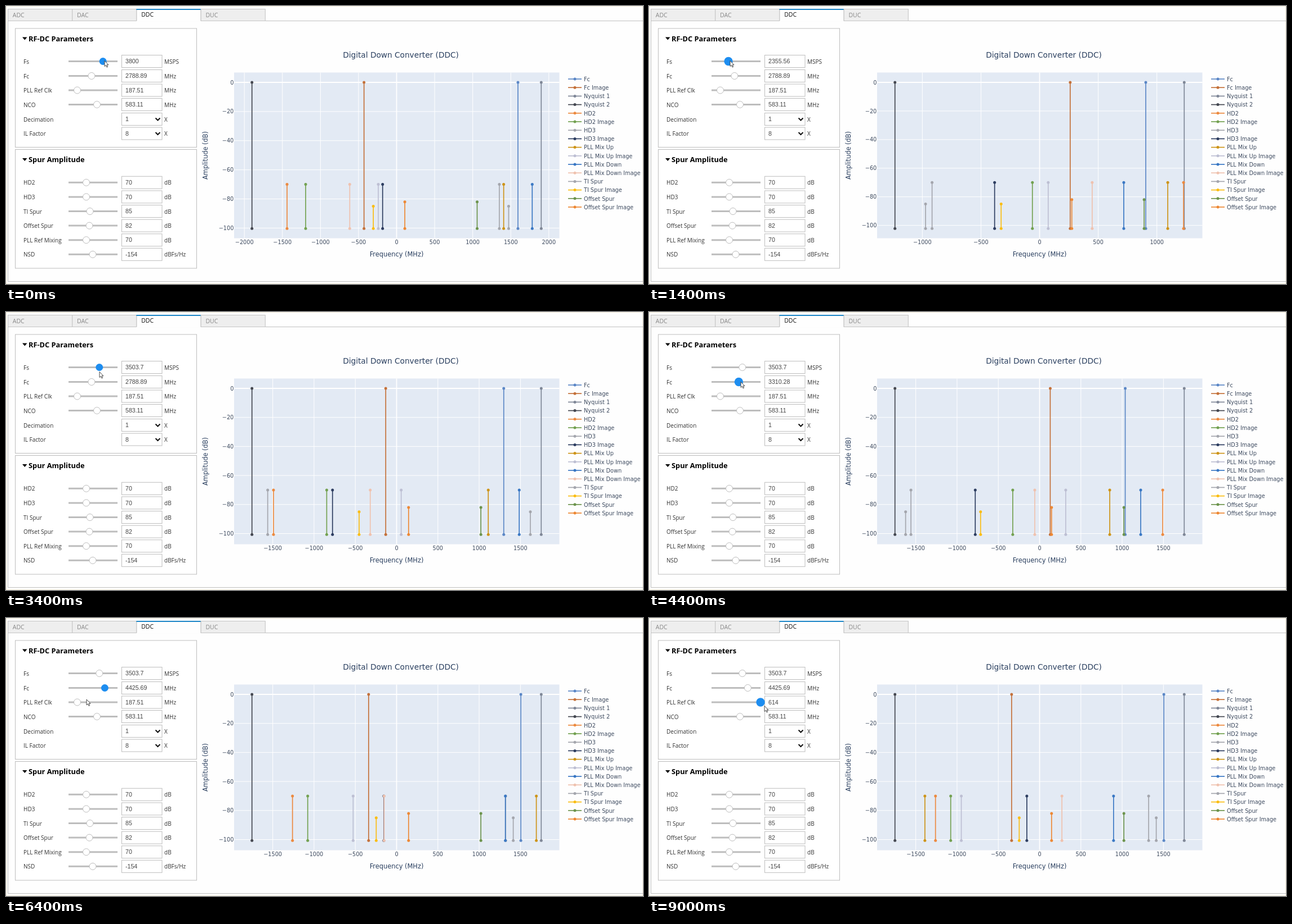
An HTML page for the animation above (9200 ms loop, 1131x495 px).

```html
<!DOCTYPE html>
<html lang="en">
<head>
<meta charset="utf-8">
<title>Digital Down Converter</title>
<style>
html, body { margin: 0; width: 100%; height: 100%; overflow: hidden; background: #fefefe; }
svg { display: block; width: 1131px; height: 495px; }
.ui { font: 10px "Open Sans", sans-serif; fill: #333; }
.tab { font-size: 10.5px; }
.head { font: bold 12.8px "Open Sans", sans-serif; fill: #000; }
.val { font: 10.6px "Liberation Sans", Arial, sans-serif; fill: #444; }
.plot { font: 9.7px "DejaVu Sans", sans-serif; fill: #3d4a5f; }
.axis { font-size: 11.4px; fill: #2a3f5f; }
.title { font-size: 13.7px; fill: #2a3f5f; }
</style>
</head>
<body>
<svg viewBox="0 0 1131 495"><g id="base"></g><g id="live"></g></svg>
<script>
const LOOP = 9200, STEP = 200, NCO = 583.11, NSD = -154;
const X0 = 693.5, HALF = 256.8, TOP = 136, FLOOR = 396.3;
const PLOT = { l: 405, r: 982.5, t: 118.5, b: 413.5 };

// Dragged values over time: [ms, value]
const FS = [[200, 3800], [1200, 2466.67], [1400, 2355.56], [2000, 2800], [2200, 2985.19], [2800, 3503.7]];
const FC = [[4000, 2788.89], [5000, 4092.36], [5200, 4314.58], [5400, 4425.69]];
const PLL = [[6800, 187.51], [7200, 243], [7400, 287.09], [7600, 325.16], [8400, 452.6], [8800, 609.24], [9000, 614]];
const CURSOR_X = [[200, 175], [1200, 146], [1400, 144], [2000, 154], [2200, 158], [2800, 168], [3200, 168],
  [3400, 166], [3800, 154], [4000, 155], [5000, 175], [5200, 180], [5400, 182], [5800, 182],
  [6600, 130], [6800, 130], [7200, 139], [7600, 153], [8400, 175], [8800, 203], [9000, 205]];
const CURSOR_Y = [[200, 97], [3200, 97], [3400, 106], [3800, 123], [5200, 125], [5800, 125],
  [6600, 151], [7600, 152], [9000, 156]];

// Sliders being moved: focus and drag times
const SLIDERS = [
  { keys: FS, y: 98.5, min: 1000, max: 5000, focus: [0, 3800], drag: [200, 3200] },
  { keys: FC, y: 124.5, min: 0, max: 6000, focus: [3800, 6600], drag: [4000, 5800] },
  { keys: PLL, y: 150, min: 100, max: 614, focus: [6600, LOOP], drag: [6800, LOOP] }
];

const SERIES = [
  ["Fc", "#5b87c6"], ["Fc Image", "#c4713a"], ["Nyquist 1", "#7f8797"], ["Nyquist 2", "#454851"],
  ["HD2", "#ec8a40"], ["HD2 Image", "#73a151"], ["HD3", "#a4a6ad"], ["HD3 Image", "#2d3d60"],
  ["PLL Mix Up", "#cd9419"], ["PLL Mix Up Image", "#bdbfd3"], ["PLL Mix Down", "#3a78c4"],
  ["PLL Mix Down Image", "#efc2af"], ["TI Spur", "#a4a6ad"], ["TI Spur Image", "#fabd12"],
  ["Offset Spur", "#6d944d"], ["Offset Spur Image", "#ed8834"]
];

function at(keys, t) {
  if (t <= keys[0][0]) return keys[0][1];
  for (let i = 1; i < keys.length; i++) {
    const [t0, a] = keys[i - 1], [t1, b] = keys[i];
    if (t <= t1) return a + (b - a) * (t - t0) / (t1 - t0);
  }
  return keys[keys.length - 1][1];
}

const within = (t, [a, b]) => t >= a && t < b;
const text = (x, y, cls, s, extra = "") => `<text x="${x}" y="${y}" class="${cls}" ${extra}>${s}</text>`;
const rect = (x, y, w, h, fill, stroke = "none") =>
  `<rect x="${x}" y="${y}" width="${w}" height="${h}" fill="${fill}" stroke="${stroke}"/>`;
const line = (x1, y1, x2, y2, color, w = 1) =>
  `<path d="M${x1} ${y1}L${x2} ${y2}" stroke="${color}" stroke-width="${w}"/>`;
const dot = (x, y, r, fill, stroke = "none") => `<circle cx="${x}" cy="${y}" r="${r}" fill="${fill}" stroke="${stroke}"/>`;
const middle = 'text-anchor="middle"';

function row(y, label, value, unit, knob) {
  return text(31, y + 4, "ui", label) + text(281, y + 4, "ui", unit) +
    rect(205.5, y - 11, 71.5, 22, "#fff", "#bdbdbd") +
    (value === "" ? "" : text(212, y + 3.6, "val", value)) +
    (unit === "X" ? `<path d="M265.5 ${y - 2}l4 4 4-4" fill="none" stroke="#111" stroke-width="2"/>`
      : line(111, y, 198, y, "#bdbdbd", 3)) +
    (knob ? dot(knob, y, 6, "#fff", "#bdbdbd") : "");
}

function panel(y, h, title) {
  return rect(16.5, y, 322, h, "#fff", "#bdbdbd") + text(40, y + 22.5, "head", title) +
    `<path d="M29 ${y + 15.5}h8.5l-4.25 5z" fill="#000"/>`;
}

function drawBase() {
  let s = `<rect x=".5" y=".5" width="1130" height="494" fill="none" stroke="#f6f0dc"/>`;
  s += `<path d="M3.5 26V490.5H1131M3.5 26.5H1131" fill="none" stroke="#c0c0c0"/>`;
  ["ADC", "DAC", "DDC", "DUC"].forEach((name, i) => {
    const x = 3.5 + i * 114.2, on = i === 2;
    s += on ? rect(x, 6, 114.2, 21.5, "#fefefe") + line(x, 6, x, 26.5, "#c0c0c0") +
        line(x + 114.2, 6, x + 114.2, 26.5, "#c0c0c0") + line(x - .5, 6, x + 114.7, 6, "#1c86c7", 2)
      : rect(x, 5.5, 114.2, 21, "#eee", "#c4c4c4");
    s += text(x + 8.3, on ? 19 : 20, "ui tab", name, `style="fill:${on ? "#111" : "#888"}"`);
  });
  s += panel(40, 211.5, "RF-DC Parameters") + panel(255.5, 211.5, "Spur Amplitude");
  s += row(98.5, "Fs", "", "MSPS") + row(124.5, "Fc", "", "MHz") + row(150, "PLL Ref Clk", "", "MHz") +
    row(175.5, "NCO", NCO, "MHz", 161.5) + row(201.5, "Decimation", 1, "X") + row(227, "IL Factor", 8, "X");
  [["HD2", 70, 142.5], ["HD3", 70, 142.5], ["TI Spur", 85, 149], ["Offset Spur", 82, 148],
    ["PLL Ref Mixing", 70, 142.5], ["NSD", NSD, 154]].forEach(([name, v, knob], i) => {
    s += row(314.3 + i * 25.6, name, v, i < 5 ? "dB" : "dBFs/Hz", knob);
  });
  s += rect(PLOT.l, PLOT.t, PLOT.r - PLOT.l, PLOT.b - PLOT.t, "#e3eaf4");
  s += text(701, 92, "plot title", "Digital Down Converter (DDC)", middle);
  s += text(X0, 445.5, "plot axis", "Frequency (MHz)", middle);
  s += text(0, 0, "plot axis", "Amplitude (dB)", middle + ' transform="translate(358 266) rotate(-90)"');
  SERIES.forEach(([name, color], i) => {
    const y = 130 + i * 15.2;
    s += line(998, y, 1022, y, color, 1.7) + dot(1010, y, 2.5, color) + text(1026, y + 3.7, "plot", name);
  });
  base.innerHTML = s;
}

function drawPlot(t) {
  const fs = at(FS, t), fc = at(FC, t), pll = at(PLL, t), nyq = fs / 2;
  const floor = NSD + 10 * Math.log10(nyq * 1e6 / 8192);
  const px = f => X0 + f / nyq * HALF;
  const py = db => TOP + db / floor * (FLOOR - TOP);
  const wrap = f => f - fs * Math.round(f / fs);
  const alias = f => Math.abs(wrap(f));
  const pair = (a, db) => [[wrap(NCO + a), db], [wrap(NCO - a), db]];
  const label = v => String(v).replace("-", "\u2212");

  let s = "";
  for (let f = -2000; f <= 2000; f += 500) {
    const x = px(f);
    if (x < PLOT.l || x > PLOT.r) continue;
    s += line(x, PLOT.t, x, PLOT.b, "#fff", f ? 1 : 1.8) + text(x, 424, "plot", label(f), middle);
  }
  for (let db = 0; db >= -100; db -= 20) {
    const y = py(db);
    s += line(PLOT.l, y, PLOT.r, y, "#fff", db ? 1 : 1.8) +
      text(404.3, y + 3.6, "plot", label(db), 'text-anchor="end"');
  }
  const stems = [
    ...pair(alias(fc), 0), [nyq, 0], [-nyq, 0],
    ...pair(alias(2 * fc), -70), ...pair(alias(3 * fc), -70),
    ...pair(alias(fc + pll), -70), ...pair(alias(fc - pll), -70),
    ...pair(nyq - alias(fc), -85), ...pair(fs / 8, -82)
  ];
  stems.forEach(([f, db], i) => {
    const x = px(f), y = py(db), color = SERIES[i][1];
    s += line(x, y, x, FLOOR, color, 1.7) + dot(x, y, 2.5, color) + dot(x, FLOOR, 2.5, color);
  });
  return s;
}

function drawLive(t) {
  // The chart trails the sliders by one step
  let s = drawPlot(Math.max(0, t - STEP));
  for (const { keys, y, min, max, focus, drag } of SLIDERS) {
    const v = at(keys, t), x = 111.8 + (v - min) / (max - min) * 86.2;
    s += text(212, y + 3.6, "val", +v.toFixed(2));
    s += within(t, focus) ? dot(x, y, within(t, drag) ? 7.7 : 6.5, "#1d8df0") : dot(x, y, 6, "#fff", "#bdbdbd");
  }
  s += `<path transform="translate(${at(CURSOR_X, t)} ${at(CURSOR_Y, t)})"
    d="M0 .5V10.5L2.3 8.4 4 12 5.6 11.3 4 7.8H7Z" fill="#fff" stroke="#333" stroke-width=".9"/>`;
  live.innerHTML = s;
}

const base = document.getElementById("base"), live = document.getElementById("live");
const start = performance.now();
let last = -1;

function tick() {
  const t = Math.floor((performance.now() - start) % LOOP / STEP) * STEP;
  if (t !== last) drawLive(last = t);
  requestAnimationFrame(tick);
}

drawBase();
tick();
</script>
</body>
</html>
```
